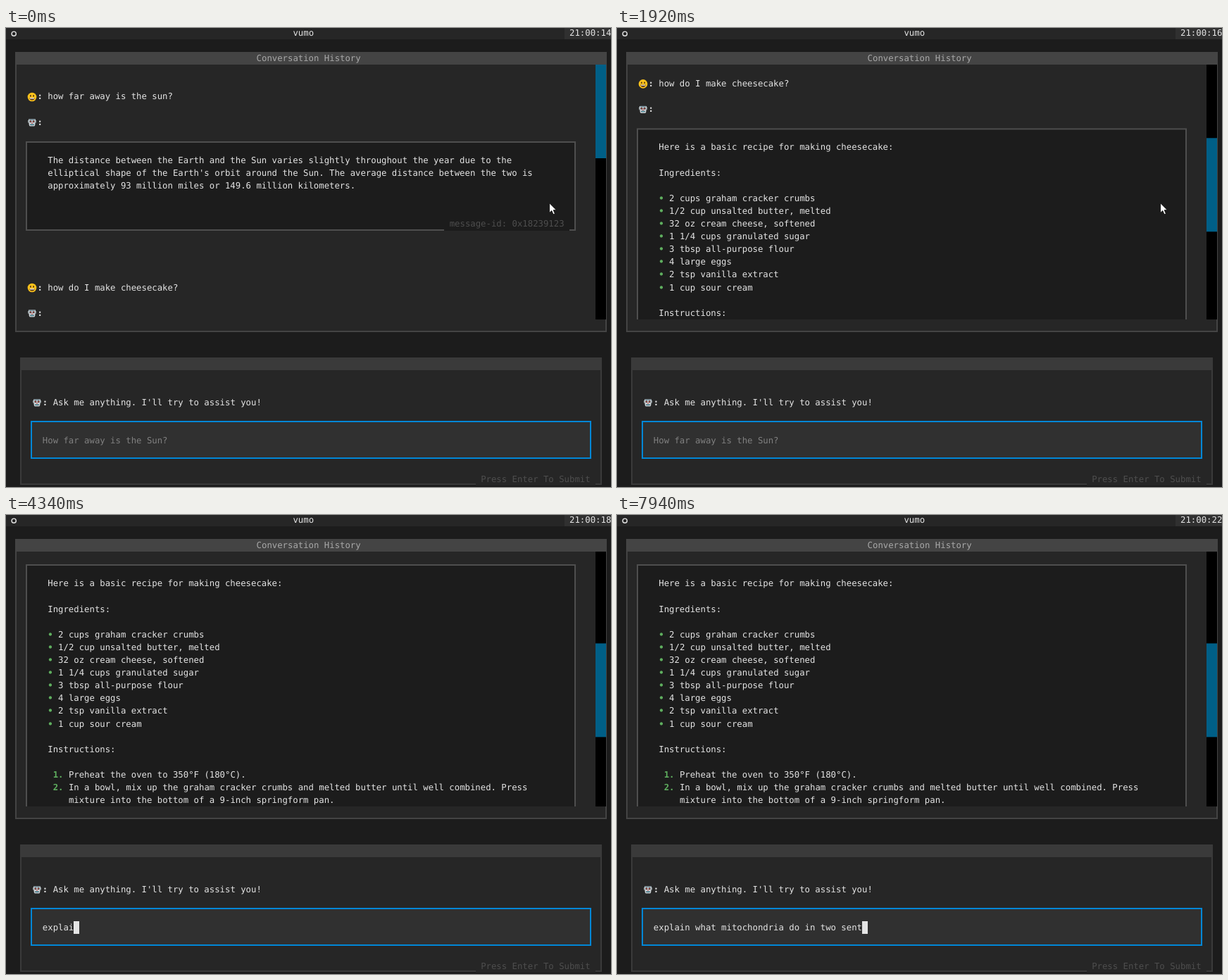
These frames come from a looping animation (859x652 px, 8 s). An HTML page:

```html
<!DOCTYPE html>
<html lang="en">
<head>
<meta charset="utf-8">
<title>Terminal chat</title>
<style>
  :root { --cw: 7.408px; --rh: 18.1px; }
  html, body { margin: 0; width: 100%; height: 100%; overflow: hidden; background: #1c1c1c; }
  #stage {
    position: relative; width: 859px; height: 652px; overflow: hidden; background: #1c1c1c; color: #e4e4e4;
    font: 12.3px/18.1px "DejaVu Sans Mono", "Noto Sans Mono", monospace;
    text-rendering: geometricPrecision; font-variant-ligatures: none;
  }
  #stage div, #stage svg { position: absolute; box-sizing: border-box; }
  .t { left: calc(var(--c) * var(--cw)); top: calc(var(--r) * var(--rh)); height: var(--rh); white-space: pre; }
  .b { font-weight: bold; }
  .green { color: #5faf5f; font-weight: bold; }
  .soft { color: #a8a8a8; }
  .hint { color: #808080; }
  .dim { color: #4e4e4e; }
  .bar { left: 0; top: 0; width: 859px; height: 16px; background: #262626; }
  .clockbg { left: 793px; top: 0; width: 66px; height: 16px; background: #303030; }
  .panel { background: #262626; border: 2px solid #444; border-top: 18px solid #444; }
  #history { left: 13px; top: 34px; width: 840px; height: 398px; }
  #prompt { left: 20px; top: 468px; width: 826px; height: 181px; border-color: #3a3a3a; }
  #view { left: 0; top: 52px; width: 837px; height: 361.5px; overflow: hidden; }
  #content { left: 0; top: .3px; width: 837px; height: 900px; }
  .msg { left: 28px; width: 781px; background: #1c1c1c; border: 2px solid #4e4e4e; }
  .gap { height: 3px; }
  #track { left: 837px; top: 52px; width: 15px; height: 361.5px; background: #000; }
  #thumb { left: 0; top: 0; width: 15px; height: 133px; background: #005f87; }
  #input { left: 35px; top: 558px; width: 796px; height: 54px; background: #303030; border: 2px solid #0087d7; }
  #cursor { width: var(--cw); background: #e4e4e4; color: #303030; }
  #rows { left: 0; top: -2px; }
  #mouse { left: 0; top: 0; width: 12px; height: 19px; }
</style>
</head>
<body>
<div id="stage">
  <div class="bar"></div>
  <div class="clockbg"></div>
  <svg style="left:6px;top:3px" width="10" height="10"><circle cx="5.2" cy="5.2" r="3.1" fill="none" stroke="#e4e4e4" stroke-width="1.4"/></svg>
  <div id="history" class="panel"></div>
  <div id="view"><div id="content"></div></div>
  <div id="track"><div id="thumb"></div></div>
  <div id="prompt" class="panel"></div>
  <div class="gap" style="left:667px;top:646.5px;width:170px;background:#262626"></div>
  <div id="input"></div>
  <div id="rows"></div>
  <svg id="mouse" viewBox="0 0 12 19"><path d="M.6 .8V14.6L3.8 11.6L6 16.8L8.4 15.8L6.2 10.7H10.4Z" fill="#fff" stroke="#111" stroke-width=".9"/></svg>
</div>

<svg width="0" height="0" style="position:absolute">
  <symbol id="smile" viewBox="0 0 14 14">
    <circle cx="7" cy="7" r="6.3" fill="#fcc21b"/>
    <ellipse cx="4.9" cy="5.4" rx=".9" ry="1.3" fill="#4a3018"/>
    <ellipse cx="9.1" cy="5.4" rx=".9" ry="1.3" fill="#4a3018"/>
    <path d="M3.2 8.2H10.8Q10.3 11.6 7 11.6T3.2 8.2Z" fill="#5b3a1c"/>
    <path d="M3.7 8.3H10.3L10 9.4H4Z" fill="#fff"/>
  </symbol>
  <symbol id="robot" viewBox="0 0 14 14">
    <path d="M1 4.2H2.4V8H1.6ZM13 4.2H11.6V8H12.4Z" fill="#b8c4c8"/>
    <path d="M2 2.6H12L11.2 11Q10.8 12.6 9.4 12.6H4.6Q3.2 12.6 2.8 11Z" fill="#cfd8dc"/>
    <path d="M2.8 2.4H11.2L10.8 4H3.2Z" fill="#78909c"/>
    <circle cx="4.9" cy="5.8" r="1.5" fill="#333"/>
    <circle cx="9.1" cy="5.8" r="1.5" fill="#333"/>
    <circle cx="4.9" cy="5.8" r=".7" fill="#f44336"/>
    <circle cx="9.1" cy="5.8" r=".7" fill="#f44336"/>
    <path d="M6.5 7.2H7.5L8 8.4H6Z" fill="#e53935"/>
    <rect x="4.2" y="9.2" width="5.6" height="2" rx=".9" fill="#37474f"/>
    <path d="M5 10.2H9" stroke="#6fd3e8" stroke-width=".8"/>
  </symbol>
</svg>

<script>
const ROW = 18.1, COL = 7.408, LOOP = 8000;
const $ = id => document.getElementById(id);
const content = $("content"), rows = $("rows");

function text(parent, col, row, str, cls = "") {
  const el = document.createElement("div");
  el.className = "t " + cls;
  el.style.setProperty("--c", col);
  el.style.setProperty("--r", row);
  el.textContent = str;
  parent.append(el);
  return el;
}

function speaker(parent, icon, col, row, str) {
  parent.insertAdjacentHTML("beforeend",
    `<svg style="left:${col * COL + .4}px;top:${row * ROW + 2.3}px" width="14" height="14"><use href="#${icon}"/></svg>`);
  text(parent, col + 2, row, ":", "b");
  text(parent, col + 4, row, str);
}

function box(row, count) {
  content.insertAdjacentHTML("beforeend",
    `<div class="msg" style="top:${row * ROW}px;height:${count * ROW}px"></div>`);
}

// History
speaker(content, "smile", 4, 2, "how far away is the sun?");
speaker(content, "robot", 4, 4, "");
box(6, 7);
[
  "The distance between the Earth and the Sun varies slightly throughout the year due to the",
  "elliptical shape of the Earth's orbit around the Sun. The average distance between the two is",
  "approximately 93 million miles or 149.6 million kilometers."
].forEach((s, i) => text(content, 8, 7 + i, s));
content.insertAdjacentHTML("beforeend",
  `<div class="gap" style="left:622px;top:${13 * ROW - 2.5}px;width:178px;background:#1c1c1c"></div>`);
text(content, 85, 12, "message-id: 0x18239123", "dim");

speaker(content, "smile", 4, 17, "how do I make cheesecake?");
speaker(content, "robot", 4, 19, "");
box(21, 28);
text(content, 8, 22, "Here is a basic recipe for making cheesecake:");
text(content, 8, 24, "Ingredients:");
[
  "2 cups graham cracker crumbs", "1/2 cup unsalted butter, melted",
  "32 oz cream cheese, softened", "1 1/4 cups granulated sugar",
  "3 tbsp all-purpose flour", "4 large eggs",
  "2 tsp vanilla extract", "1 cup sour cream"
].forEach((s, i) => {
  text(content, 8, 26 + i, "•", "green");
  text(content, 10, 26 + i, s);
});
text(content, 8, 35, "Instructions:");
text(content, 9, 37, "1.", "green");
text(content, 12, 37, "Preheat the oven to 350°F (180°C).");
text(content, 9, 38, "2.", "green");
text(content, 12, 38, "In a bowl, mix up the graham cracker crumbs and melted butter until well combined. Press");
text(content, 12, 39, "mixture into the bottom of a 9-inch springform pan.");

// Fixed rows
text(rows, 55, 0, "vumo");
const clock = text(rows, 108, 0, "");
text(rows, 48, 2, "Conversation History", "soft");
speaker(rows, "robot", 5, 29, "Ask me anything. I'll try to assist you!");
const field = text(rows, 7, 32, "");
const cursor = text(rows, 7, 32, "");
cursor.id = "cursor";
text(rows, 91, 35, "Press Enter To Submit", "dim");

const HINT = "How far away is the Sun?";
const QUERY = "explain what mitochondria do in two sentences";
const WHEEL = [430, 840, 950, 1200, 1320, 1590, 1650, 1920, 2230, 2290];
// Key bursts: start, interval, key count
const BURSTS = [
  [3750, 115, 3], [4130, 60, 2], [4340, 66, 9], [5020, 60, 2],
  [5230, 90, 2], [5470, 90, 3], [5920, 60, 10], [7250, 86, 9]
];
const clamp = (v, lo, hi) => Math.min(hi, Math.max(lo, v));

function typedCount(t) {
  return BURSTS.reduce((n, [start, step, keys]) =>
    n + clamp(Math.floor((t - start) / step) + 1, 0, keys), 0);
}

function cursorOn(t) {
  if (t < 3280) return t >= 430 && Math.floor((t - 430) / 475) % 2 === 0;
  return t < 6720 || t >= 7160;
}

function draw(t) {
  const scroll = 2 * WHEEL.filter(at => t >= at).length;
  content.style.transform = `translateY(${-scroll * ROW}px)`;
  $("thumb").style.transform = `translateY(${scroll * 6.52}px)`;

  clock.textContent = "21:00:" + (14 + Math.max(0, Math.floor((t - 890) / 970) + 1));

  const n = typedCount(t);
  field.textContent = n ? QUERY.slice(0, n) : HINT;
  field.classList.toggle("hint", n === 0);
  cursor.style.setProperty("--c", 7 + n);
  cursor.textContent = n ? " " : HINT[0];
  cursor.style.visibility = cursorOn(t) ? "visible" : "hidden";

  const p = clamp((t - 2740) / 370, 0, 1), e = p * p * (3 - 2 * p);
  $("mouse").style.transform = `translate(${771 - 401 * e}px, ${248 + 345 * e}px)`;
  $("mouse").style.visibility = t < 3440 ? "visible" : "hidden";
}

function tick() {
  // Half a display frame ahead, so hard changes land on time
  draw((performance.now() + 8) % LOOP);
  requestAnimationFrame(tick);
}
tick();
</script>
</body>
</html>
```
